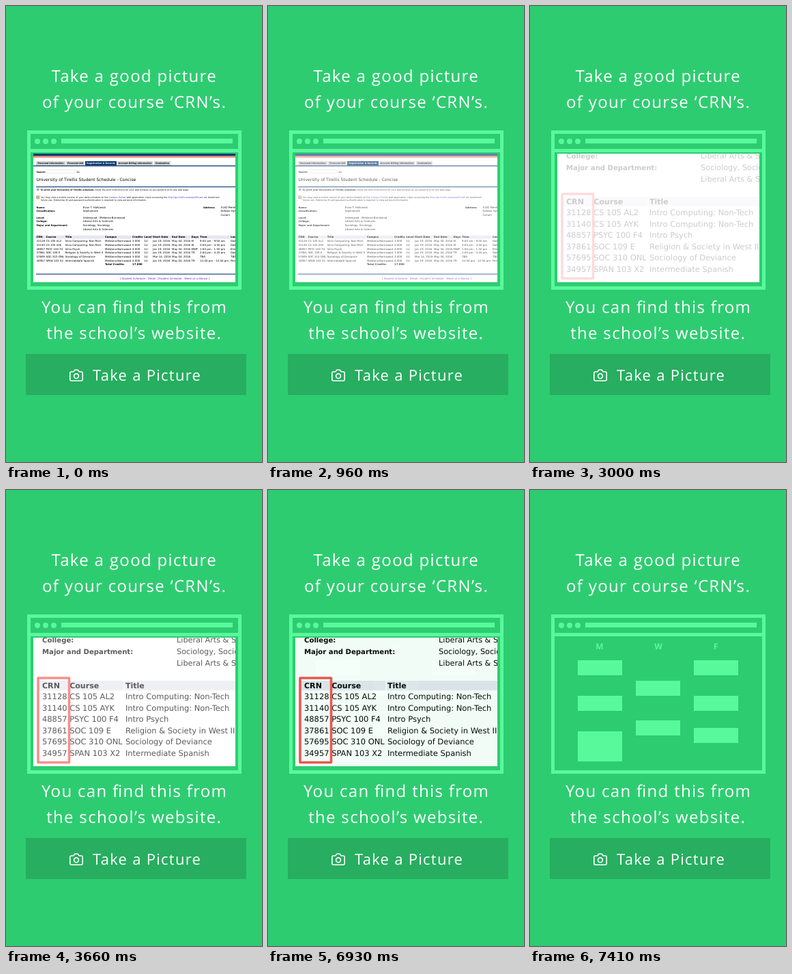
Recreate the animation shown at these times as an HTML page. Size 375 by 667 pixels, loop 7940 ms.

```html
<!DOCTYPE html>
<html lang="en">
<head>
<meta charset="utf-8">
<title>Take a good picture</title>
<style>
  html, body { margin: 0; width: 100%; height: 100%; overflow: hidden; background: #2ecc71; }
  svg { display: block; width: 375px; height: 667px; }
  text { text-rendering: geometricPrecision; white-space: pre; }
  .say { font: 24px "Open Sans", sans-serif; letter-spacing: 1.32px; font-feature-settings: "liga" 1; fill: #fff; }
  .button { font-size: 22px; letter-spacing: 1.28px; }
  .lite { fill: #58f99b; }
  .day { font: bold 12px "Open Sans", sans-serif; text-anchor: middle; }
  .page text { font-family: "DejaVu Sans", sans-serif; }
  .sheet { animation: sheet 7940ms linear infinite; }
  .wide { animation: wide 7940ms linear infinite; }
  .near { animation: near 7940ms linear infinite; }
  @keyframes sheet { 0%, 86.902% { opacity: 1; } 93.325%, 100% { opacity: 0; } }
  @keyframes wide { 0% { opacity: 1; } 34.005%, 100% { opacity: 0; } }
  @keyframes near { 0%, 34.005% { opacity: 0; } 52.897%, 100% { opacity: 1; } }
</style>
</head>
<body>
<svg viewBox="0 0 375 667">
  <defs>
    <clipPath id="view"><rect x="40" y="216" width="296" height="188"/></clipPath>
    <g id="page" class="page"></g>
  </defs>
  <rect width="375" height="667" fill="#2ecc71"/>

  <text class="say" x="66.5" y="111">Take a good picture</text>
  <text class="say" x="52.9" y="149">of your course ‘CRN’s.</text>
  <text class="say" x="52" y="449">You can find this from</text>
  <text class="say" x="59.2" y="487">the school’s website.</text>

  <rect x="29" y="509" width="323" height="60" fill="#27ae60"/>
  <g fill="none" stroke="#fff" stroke-width="1.6" stroke-linejoin="round">
    <path d="M96 535h2.2q.8 0 1.2-.7l.7-1.2q.5-.9 1.5-.9h2.8q1 0 1.5.9l.7 1.2q.4.7 1.2.7h2.2q2.2 0 2.2 2.2v8.8q0 2.2-2.2 2.2h-14q-2.2 0-2.2-2.2v-8.8q0-2.2 2.2-2.2z"/>
    <circle cx="103" cy="541.3" r="3.4"/>
  </g>
  <text class="say button" x="127" y="548">Take a Picture</text>

  <rect x="33.5" y="184.5" width="309" height="228" fill="none" stroke="#58f99b" stroke-width="5"/>
  <g class="lite">
    <rect x="36" y="209" width="304" height="5"/>
    <circle cx="46" cy="198" r="4"/>
    <circle cx="58" cy="198" r="4"/>
    <circle cx="70" cy="198" r="4"/>
    <rect x="81" y="194" width="251" height="7"/>
    <text class="day" x="102" y="233">M</text>
    <text class="day" x="188" y="233">W</text>
    <text class="day" x="272" y="233">F</text>
    <path d="M70 249h65v22h-65zM70 301h65v22h-65zM70 353h65v44h-65zM155 279h65v22h-65zM155 337h65v22h-65zM240 249h65v22h-65zM240 301h65v22h-65zM240 348h65v22h-65z"/>
  </g>

  <g clip-path="url(#view)">
    <g class="sheet">
      <rect x="40" y="216" width="296" height="188" fill="#fff"/>
      <g class="wide"><use href="#page"/></g>
      <g class="near">
        <use href="#page" transform="translate(-75.6 -690.9) scale(2.89)"/>
        <rect x="47" y="275" width="45.5" height="123.5" fill="none" stroke="#f4514c" stroke-width="3.6" stroke-linejoin="round"/>
      </g>
    </g>
  </g>
</svg>
<script>
  const page = document.getElementById('page');
  const NAVY = '#0b3a6f', BLUE = '#2a2ad0';

  function add(tag, attrs, label) {
    const el = document.createElementNS('http://www.w3.org/2000/svg', tag);
    for (const key in attrs) el.setAttribute(key, attrs[key]);
    if (label) el.textContent = label;
    page.append(el);
    return el;
  }
  const box = (x, y, width, height, fill) => add('rect', { x, y, width, height, fill });
  const put = (x, y, size, label, more) => add('text', { x, y, 'font-size': size, ...more }, label);
  const bold = { 'font-weight': 'bold' };

  // A line made of [text, style] runs
  function runs(x, y, size, parts) {
    const line = put(x, y, size, '');
    for (const [label, style] of parts) line.append(add('tspan', style || {}, label));
  }

  // Banner, tabs and search
  box(40, 216, 296, 3.6, NAVY);
  box(40, 219.6, 296, 2.2, '#f08a78');
  [['Personal Information', 44, 43], ['Financial Aid', 88, 27], ['Registration & Records', 116, 46],
   ['Account Billing Information', 163, 52], ['Graduation', 217, 24]].forEach(([label, x, w], i) => {
    const on = i === 2;
    box(x, 227, w, 6.3, on ? NAVY : '#cfcfcf');
    put(x + w / 2, 231.4, 3.2, label, { ...bold, 'text-anchor': 'middle', fill: on ? '#fff' : '#111' });
  });
  box(40, 233.2, 296, 1.3, NAVY);
  put(44.5, 243.7, 3.4, 'Search', bold);
  add('rect', { x: 60, y: 239.5, width: 41, height: 5.2, fill: '#fff', stroke: '#ccc', 'stroke-width': .4 });
  box(102.5, 239.8, 6, 5, '#eee');
  put(103.8, 243.5, 2.8, 'Go');

  // Heading and notes
  put(44.5, 256.4, 6.1, 'University of Tirellis Student Schedule - Concise');
  box(44, 264, 292, 1.1, NAVY);
  box(45, 266.8, 3.6, 3.2, '#9aa7b8');
  runs(50.5, 270, 3.2, [
    ['To print your University of Tirellis schedule,', bold],
    [' follow the print instructions for your web browser as you would to print any web page.']]);
  box(44, 277.4, 5.4, 5, '#c9b48a');
  runs(51, 280.6, 3.25, [
    ['You may view a mobile version of your daily schedule on the '],
    ['Campus Pocket', { fill: BLUE }],
    [' web application. Upon accessing the '],
    ['http://go.tirellis.example/Pocket', { fill: BLUE }],
    [' url, bookmark']]);
  put(51, 285, 3.25, 'future use. Enterprise ID and password authentication is required to view personal information.');

  // Student details
  [['Name:', 295.5, 'Evan T. Hollowick'], ['Classification:', 301.2, 'Sophomore'],
   ['Level:', 310.7, 'Undergrad - Meldana-Bornwood'], ['College:', 316.4, 'Liberal Arts & Sciences'],
   ['Major and Department:', 322.1, 'Sociology, Sociology'], ['', 328, 'Liberal Arts & Sciences']
  ].forEach(([name, y, value]) => {
    put(44.5, y, 3.5, name, bold);
    put(112.7, y, 3.88, value);
  });
  put(289, 295.5, 3.5, 'Address:', bold);
  ['5182 Merel Ln', 'Fallows Hythe', 'Corwin'].forEach((s, i) => put(314.5, 295.5 + i * 5.5, 3.88, s));

  // Course table
  const cols = [44.5, 58.4, 86.7, 145, 185, 202.3, 215, 243, 271.5, 284, 329];
  const headY = 339.4, step = 5.71;
  ['CRN', 'Course', 'Title', 'Campus', 'Credits', 'Level', 'Start Date', 'End Date', 'Days', 'Time', 'Location']
    .forEach((label, i) => {
      const x = i ? cols[i] - .4 : 42.4;
      box(x, 335.6, (cols[i + 1] || 340) - .9 - x, 4.9, '#e6e6f1');
      put(cols[i], headY, 3.83, label, bold);
    });
  const jan = 'Jan 19, 2016';
  [
    ['31128', 'CS 105 AL2', 'Intro Computing: Non-Tech', '3.000', jan, 'M', '9:00 am - 9:50 am', 'Oak'],
    ['31140', 'CS 105 AYK', 'Intro Computing: Non-Tech', '0.000', jan, 'W', '3:00 pm - 4:50 pm', 'Oak'],
    ['48857', 'PSYC 100 F4', 'Intro Psych', '4.000', jan, 'MWF', '1:00 pm - 1:50 pm', 'Elm'],
    ['37861', 'SOC 109 E', 'Religion & Society in West II', '3.000', jan, 'TR', '2:00 pm - 3:20 pm', 'Oak'],
    ['57695', 'SOC 310 ONL', 'Sociology of Deviance', '3.000', 'Mar 14, 2016', '', 'TBA', 'TBA'],
    ['34957', 'SPAN 103 X2', 'Intermediate Spanish', '4.000', jan, 'TR', '12:00 pm - 12:50 pm', 'Fern']
  ].forEach(([crn, course, title, credits, start, days, time, place], r) => {
    [crn, course, title, 'Meldana-Bornwood', credits, '1U', start, 'May 04, 2016', days, time, place]
      .forEach((label, i) => put(cols[i], headY + step * (r + 1), 3.98, label));
  });
  put(145, headY + step * 7, 3.83, 'Total Credits:', bold);
  put(185, headY + step * 7, 3.83, '17.000', bold);

  // Footer
  box(44, 391.6, 292, 1.1, NAVY);
  put(232.5, 399.8, 3.9, '[ Student Schedule - Detail | Student Schedule - Week at a Glance ]',
    { 'text-anchor': 'middle', fill: '#5a2aa8' });
</script>
</body>
</html>
```
